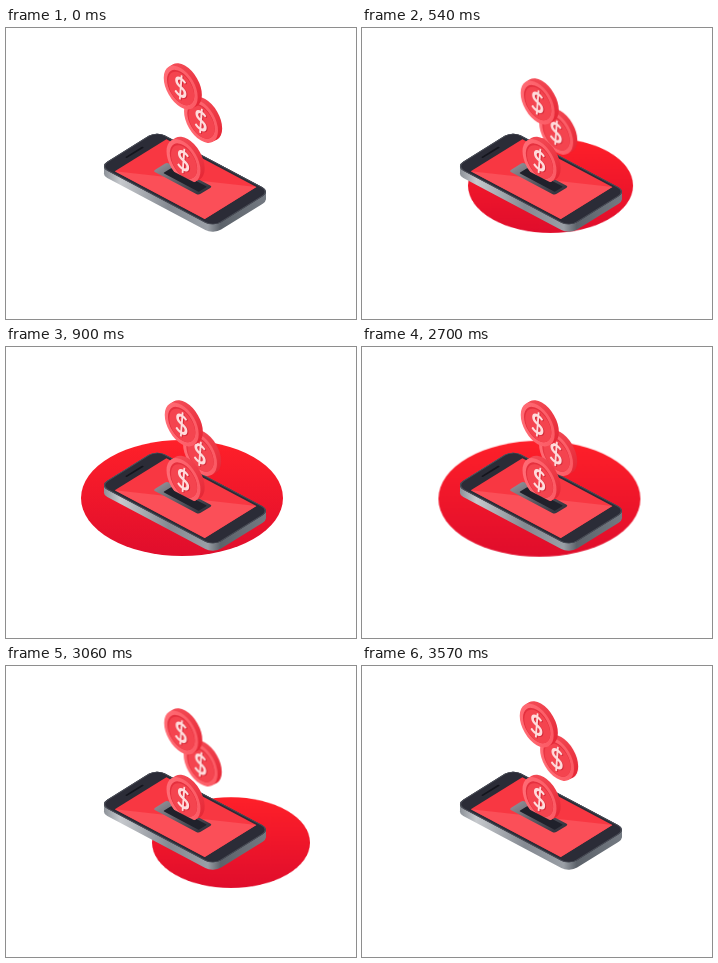
Animation, 350 px wide and 291 px high, one loop 3600 ms. Source, as an HTML page:

```html
<!DOCTYPE html>
<html lang="en">
<head>
<meta charset="utf-8">
<title>Coins dropping into a phone</title>
<style>
  html, body { margin: 0; width: 100%; height: 100%; overflow: hidden; background: #fff; }
  svg { display: block; width: 100vw; height: 100vh; }

  .drift, .grow, .coin { animation: 3600ms linear infinite; }
  .drift { animation-name: drift; }
  .grow { animation-name: grow; }
  .coin { animation-name: drop; }

  /* Sine-out drift and drop; the disc grows sine-out and shrinks sine-in */
  @keyframes drift {
    0% { transform: translate(78.5px, 41px); animation-timing-function: cubic-bezier(.39, .575, .565, 1); }
    25%, 74.72% { transform: translate(0, 0); animation-timing-function: cubic-bezier(.39, .575, .565, 1); }
    99.72%, 100% { transform: translate(78.5px, 41px); }
  }
  @keyframes grow {
    0%, 11.667% { transform: scale(0); animation-timing-function: cubic-bezier(.39, .575, .565, 1); }
    17.5%, 82.5% { transform: scale(1); animation-timing-function: cubic-bezier(.47, 0, .745, .715); }
    88.333%, 100% { transform: scale(0); }
  }
  @keyframes drop {
    0% { transform: translate(0, 0); animation-timing-function: cubic-bezier(.39, .575, .565, 1); }
    25%, 75% { transform: translate(var(--dx), var(--dy)); animation-timing-function: cubic-bezier(.39, .575, .565, 1); }
    100% { transform: translate(0, 0); }
  }

  .sign { font: 700 27px Lato, "Open Sans", sans-serif; text-anchor: middle; }
</style>
</head>
<body>
<svg viewBox="0 0 350 291" aria-label="Coins dropping into a phone">
  <defs>
    <linearGradient id="disc" x1="0" y1="0" x2="0" y2="1">
      <stop offset="0" stop-color="#ff2029"/>
      <stop offset="1" stop-color="#e00d2c"/>
    </linearGradient>
    <linearGradient id="side" gradientUnits="userSpaceOnUse" x1="98" y1="0" x2="260" y2="0">
      <stop offset="0" stop-color="#8d9299"/>
      <stop offset=".1" stop-color="#c6c9cd"/>
      <stop offset=".4" stop-color="#858a92"/>
      <stop offset=".64" stop-color="#9a9fa6"/>
      <stop offset=".72" stop-color="#5c626a"/>
      <stop offset="1" stop-color="#747a82"/>
    </linearGradient>
    <linearGradient id="plate">
      <stop offset="0" stop-color="#8a8a91"/>
      <stop offset=".5" stop-color="#5a5a63"/>
      <stop offset="1" stop-color="#33343e"/>
    </linearGradient>
    <linearGradient id="edge" x1="0" y1="0" x2="1" y2="1">
      <stop offset="0" stop-color="#f6525c"/>
      <stop offset="1" stop-color="#e3202f"/>
    </linearGradient>
    <linearGradient id="rim">
      <stop offset="0" stop-color="#ff6c75"/>
      <stop offset="1" stop-color="#fb5a64"/>
    </linearGradient>

    <!-- Phone top, drawn flat and projected -->
    <rect id="top" width="128" height="66" rx="9"
          transform="matrix(.891 .4727 -.867 .538 150.5 103)"/>
    <clipPath id="body">
      <use href="#top"/>
      <use href="#top" y="7.3"/>
      <path d="M98 137.8 260 164.1V171.4L98 145.1Z"/>
    </clipPath>
    <clipPath id="inSlot">
      <path d="M150 100H210V165.4L150 134.4Z"/>
    </clipPath>

    <g id="coin">
      <g fill="url(#edge)">
        <circle r="19.6" transform="matrix(.866 .5 0 1 4.2 -2.4)"/>
        <circle r="19.6" transform="matrix(.866 .5 0 1 2.1 -1.2)"/>
      </g>
      <g transform="matrix(.866 .5 0 1 0 0)">
        <circle r="19.6" fill="url(#rim)"/>
        <circle r="15.8" fill="#e5303e"/>
        <circle cx=".6" cy=".6" r="15" fill="#f4444f"/>
        <text class="sign" x="1" y="9.6" fill="#d32837">$</text>
        <text class="sign" x="-.3" y="9.6" fill="#ffdcdc">$</text>
      </g>
    </g>
  </defs>

  <g transform="translate(176 151)">
    <g class="drift">
      <ellipse class="grow" rx="101" ry="58" fill="url(#disc)"/>
    </g>
  </g>

  <path d="M90 95H270V210H90Z" fill="url(#side)" clip-path="url(#body)"/>
  <use href="#top" fill="#2b2c37"/>
  <g transform="matrix(.891 .4727 -.867 .538 150.5 103)">
    <rect x=".5" y=".5" width="127" height="65" rx="8.5" fill="none" stroke="#4b4e58"/>
    <path d="M14 3H115V62.5H14Z" fill="#f83742"/>
    <path d="M14 62.5 115 3V62.5Z" fill="#fb4f58"/>
    <path d="M7.5 24V42" stroke="#14151d" stroke-width="2" stroke-linecap="round"/>
    <rect x="37" y="26" width="51" height="16" rx="2.5" fill="url(#plate)"/>
    <rect x="45" y="29" width="40" height="9.5" rx="1" fill="#20212b"/>
  </g>

  <g transform="translate(195 93)">
    <use class="coin" href="#coin" style="--dx: -1px; --dy: 14px"/>
  </g>
  <g transform="translate(174.7 59.5)">
    <use class="coin" href="#coin" style="--dx: 1px; --dy: 18px"/>
  </g>
  <g clip-path="url(#inSlot)">
    <use href="#coin" x="177.5" y="133"/>
  </g>
</svg>
</body>
</html>
```
